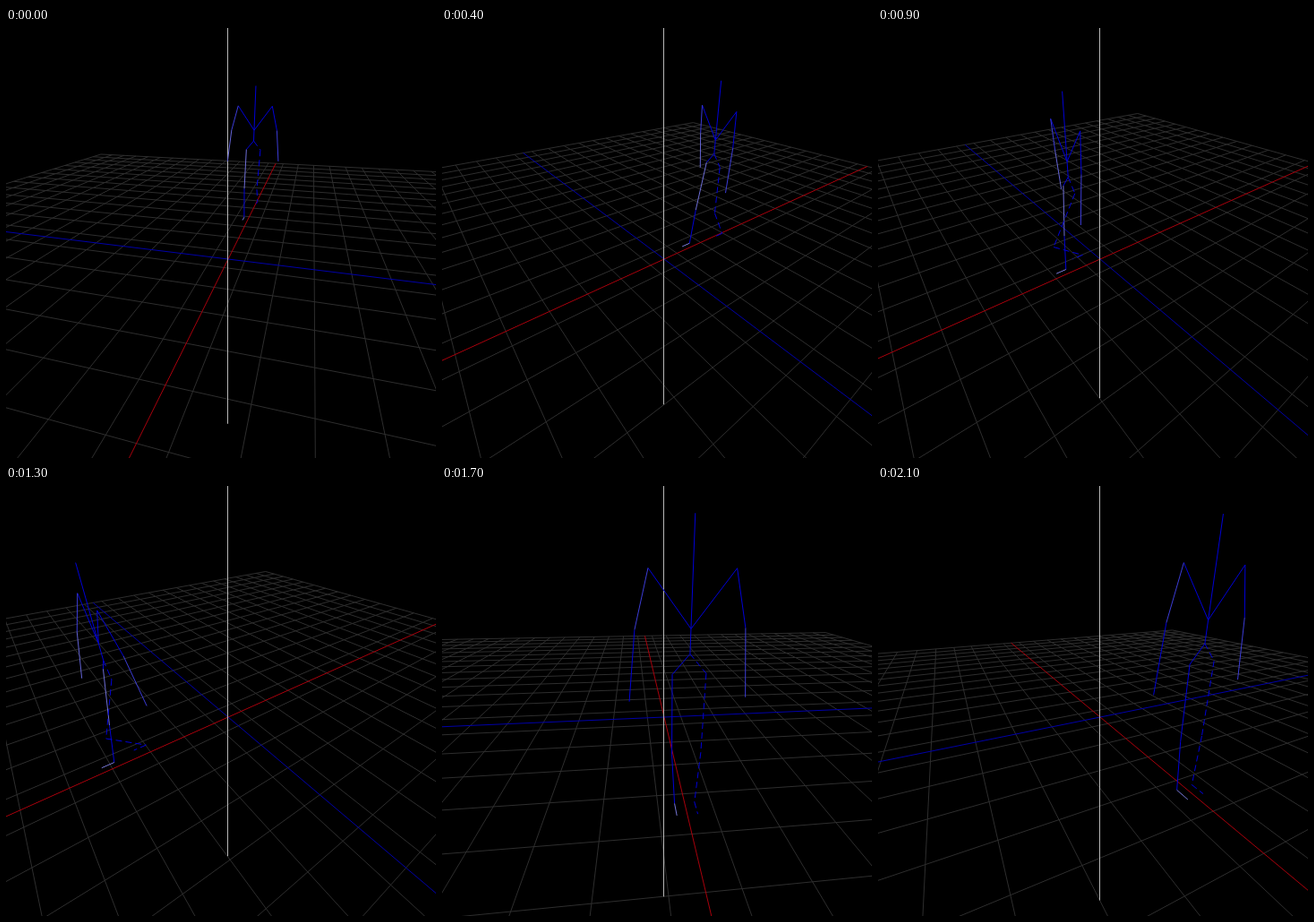
Animation, 480 px wide and 480 px high, one loop 2200 ms. Source, as an HTML page with a canvas:

```html
<!DOCTYPE html>
<html lang="en">
<head>
<meta charset="utf-8">
<title>Walking skeleton on a grid</title>
<style>
  html, body { margin: 0; width: 100%; height: 100%; overflow: hidden; background: #000; }
  canvas { display: block; width: 480px; height: 480px; }
</style>
</head>
<body>
<canvas id="stage" width="480" height="480"></canvas>
<script>
const ctx = document.getElementById('stage').getContext('2d');
const STEP = 100, STEPS = 22;
const CX = 248, CY = 258, FOCAL = 333, NEAR = 0.05;
const CELL = 0.112, HALF = 13.5, REACH = CELL * HALF, MAST = 0.93;

// Camera keys: step, azimuth, elevation (degrees)
const shots = [
  [0, 13.9, 29.8], [4, 52.1, 35.9], [9, 54, 38],
  [13, 54, 38], [17, -5.8, 25.3], [21, -26.2, 24.2]
];

// World points are [u, v, h]: along red, along blue, height
const START = 0.43, PACE = 0.059, STOP = -0.42;
const CYCLE = 4.3, CONTACT = 8.14, STRIDE = 0.063, LIFT = 0.07;
const THIGH = 0.157, SHIN = 0.121, HIP = THIGH + SHIN;

const mix = (a, b, k) => a + (b - a) * k;
const clamp = x => Math.max(0, Math.min(1, x));

function cameraAt(step) {
  const i = Math.max(1, shots.findIndex(s => s[0] >= step));
  const a = shots[i - 1], b = shots[i];
  const k = (step - a[0]) / (b[0] - a[0]);
  const az = mix(a[1], b[1], k) * Math.PI / 180;
  const el = mix(a[2], b[2], k) * Math.PI / 180;
  return { s: Math.sin(az), c: Math.cos(az), sin: Math.sin(el), cos: Math.cos(el) };
}

function view(cam, [u, v, h = 0]) {
  const ahead = u * cam.c - v * cam.s;
  return {
    x: u * cam.s + v * cam.c,
    y: ahead * cam.sin + h * cam.cos,
    z: 1 + ahead * cam.cos - h * cam.sin
  };
}

const screen = p => [CX + FOCAL * p.x / p.z, CY - FOCAL * p.y / p.z];

function clip(p, q) {
  if (p.z >= NEAR) return p;
  const k = (NEAR - p.z) / (q.z - p.z);
  return { x: mix(p.x, q.x, k), y: mix(p.y, q.y, k), z: NEAR };
}

function line(cam, from, to, color) {
  const p = view(cam, from), q = view(cam, to);
  if (p.z < NEAR && q.z < NEAR) return;
  ctx.strokeStyle = color;
  ctx.beginPath();
  ctx.moveTo(...screen(clip(p, q)));
  ctx.lineTo(...screen(clip(q, p)));
  ctx.stroke();
}

function drawFloor(cam) {
  for (let i = 0; i <= 2 * HALF; i++) {
    const d = (i - HALF) * CELL;
    line(cam, [-REACH, d], [REACH, d], '#2e2e2e');
    line(cam, [d, -REACH], [d, REACH], '#2e2e2e');
  }
  line(cam, [-REACH, 0], [REACH, 0], '#a8000c');
  line(cam, [0, -REACH], [0, REACH], '#0000a8');
  const bottom = screen(view(cam, [0, 0, -MAST]))[1];
  ctx.fillStyle = '#b8b8b8';
  ctx.fillRect(CX - 1, 0, 1, bottom);
}

function chain(cam, points, tints = []) {
  for (let i = 1; i < points.length; i++) {
    const w = Math.round(200 * (tints[i - 1] || 0));
    line(cam, points[i - 1], points[i], `rgb(${w},${w},215)`);
  }
}

// Two-bone leg with the knee bending towards the walking direction
function leg(u, side, phase, gait) {
  const hip = [u, side * 0.029, HIP];
  const foot = [
    u - gait * STRIDE * Math.cos(phase),
    side * 0.021,
    gait * LIFT * Math.max(0, -Math.sin(phase))
  ];
  const du = foot[0] - u, dh = foot[2] - HIP;
  const span = Math.hypot(du, dh);
  const along = (THIGH ** 2 - SHIN ** 2 + span ** 2) / (2 * span);
  const bend = Math.sqrt(Math.max(0, THIGH ** 2 - along ** 2));
  const knee = [
    u + (du * along + dh * bend) / span,
    side * 0.028,
    HIP + (dh * along - du * bend) / span
  ];
  const toe = [foot[0] - 0.035, foot[1], foot[2]];
  return [hip, knee, foot, toe];
}

const arm = (u, side, sway) => [
  [u, side * 0.066, 0.438],
  [u + sway / 2, side * 0.089, 0.352],
  [u + sway, side * 0.103, 0.232]
];

function drawBody(cam, step) {
  const u = Math.max(START - PACE * step, STOP);
  const gait = clamp((16 - step) / 3);
  const phase = 2 * Math.PI * (step - CONTACT) / CYCLE;
  const sway = 0.06 * gait * Math.cos((step - 6) / 3);
  const head = [u, 0, 0.505], chest = [u, 0, 0.352], pelvis = [u, 0, 0.312];

  chain(cam, [head, chest, pelvis]);
  chain(cam, [chest, ...arm(u, -1, sway)], [0, 0.3, 0.5 * gait]);
  chain(cam, [chest, ...arm(u, 1, -sway)], [0, 0, 0.3]);
  chain(cam, [pelvis, ...leg(u, -1, phase, gait)], [0, 0.55 * gait, 0, 0.6]);
  ctx.setLineDash([7, 4]);
  chain(cam, [pelvis, ...leg(u, 1, phase + Math.PI, gait)]);
  ctx.setLineDash([]);
}

function draw(step) {
  const cam = cameraAt(step);
  ctx.fillStyle = '#000';
  ctx.fillRect(0, 0, 480, 480);
  ctx.lineWidth = 1;
  drawFloor(cam);
  drawBody(cam, step);
}

const start = performance.now();
function tick() {
  draw(Math.floor((performance.now() - start) / STEP) % STEPS);
  requestAnimationFrame(tick);
}
tick();
</script>
</body>
</html>
```
